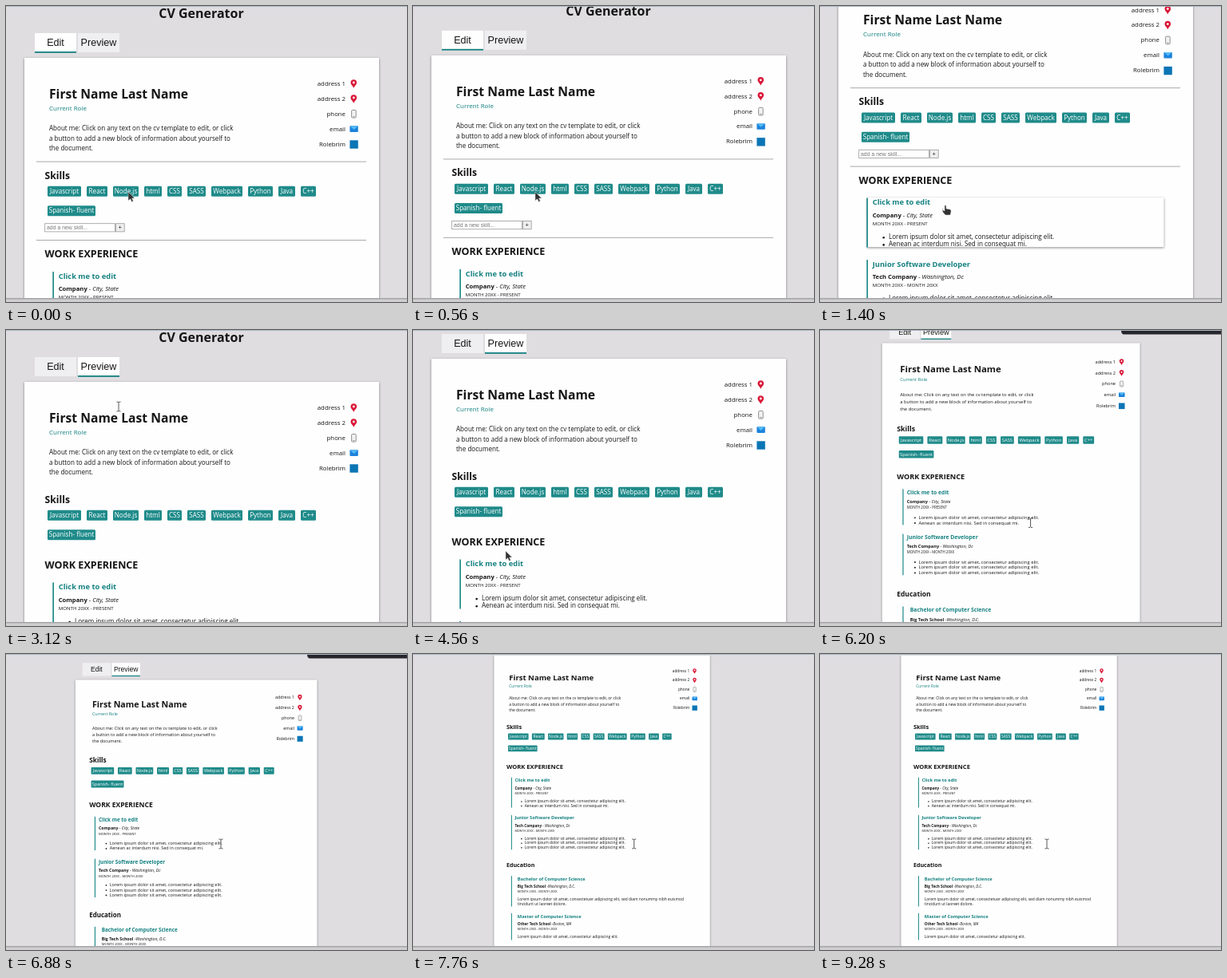
These frames come from a looping animation (502x371 px, 9560 ms). An HTML page:

```html
<!DOCTYPE html>
<html lang="en">
<head>
<meta charset="utf-8">
<title>CV Generator</title>
<style>
  html, body { margin: 0; width: 100%; height: 100%; overflow: hidden; background: #dfdde0; }
  svg { display: block; width: 502px; height: 371px; }
  text { font: 8.05px "Open Sans", "Noto Sans", sans-serif; fill: #161616; white-space: pre; }
  .bold { font-weight: 700; }
  .teal { fill: #148080; }
  .white { fill: #fff; }
  .ui { font-family: "Liberation Sans", Arial, sans-serif; }
  .middle { text-anchor: middle; }
  .end { text-anchor: end; }
  .detail { font-weight: 400; font-style: italic; }
  .sheet { filter: drop-shadow(0 1px 1.5px #0007); }
</style>
</head>
<body>
<svg viewBox="0 0 502 371">
  <rect width="502" height="371" fill="#dfdde0"/>
  <g id="view"></g>
  <path id="zoomBubble" d="M377 0H502V5.5H380Q377 5 377 0Z" fill="#25252b"/>
  <rect width="502" height="1" fill="#a9b6c2"/>
  <rect y="366" width="502" height="5" fill="#cfced0"/>
  <rect y="366" width="502" height="1.5" fill="#a5a4a6"/>
  <g id="cursor">
    <path id="arrow" d="M0 0V11L2.6 8.8 4.4 12.4 6.3 11.4 4.6 8H8Z" fill="#333" stroke="#ddd" stroke-width=".5"/>
    <path id="hand" d="M-1 0Q.5-1 1 1V4L6 5Q7.5 5.5 7 8L6 12H0L-3.5 8Q-4-.0-3 6L-1 7Z" fill="#333" stroke="#ddd" stroke-width=".5"/>
    <path id="beam" d="M-2.5-6Q0-6 0-5Q0-6 2.5-6M0-5V5M-2.5 6Q0 6 0 5Q0 6 2.5 6" fill="none" stroke="#555"/>
  </g>
</svg>
<script>
const LOOP = 9560;
const EDIT_SHIFT = 16.5;
const PREVIEW_AT = 2400;
const ZOOM_CENTER = 223.5;
const LOREM = "Lorem ipsum dolor sit amet, consectetur adipiscing elit.";
const $ = id => document.getElementById(id);

// y is the middle of the capitals
const text = (x, y, content, size = 8.05, cls = "") =>
  `<text x="${x}" y="${y + size * .34}" class="${cls}" style="font-size:${size}px">${content}</text>`;
const rect = (x, y, w, h, fill, extra = "") =>
  `<rect x="${x}" y="${y}" width="${w}" height="${h}" fill="${fill}" ${extra}/>`;

const tab = (id, x, label) =>
  rect(x, 34, 52, 24, "#efeef0", `id="${id}"`) +
  rect(x, 57, 52, 1.8, "#148080", `id="${id}Line"`) +
  text(x + 26, 46, label, 12.6, "ui middle");

const tag = (x, y, w, label) =>
  rect(x, y - 6.5, w, 13, "#1f8b8a", 'rx="1.5"') + text(x + w / 2, y, label, 8.1, "white middle");

const pin = y =>
  `<path d="M435.3 ${y + 5.5}C434 ${y + 2} 431.5 ${y + 1} 431.5 ${y - 1.5}A3.8 3.8 0 0 1 439.1 ${y - 1.5}C439.1 ${y + 1} 436.6 ${y + 2} 435.3 ${y + 5.5}Z" fill="#da1737"/>
   <circle cx="435.3" cy="${y - 1.5}" r="1.4" fill="#fff"/>`;

const entry = (x, y, title, place, detail, dates) =>
  text(x, y, title, 9.35, "bold teal") +
  text(x, y + 16.2, `${place}<tspan class="detail">${detail}</tspan>`, 7.68, "bold") +
  text(x, y + 26.5, dates, 6.1);

const bullets = (y, lines) => lines.map((line, i) =>
  `<circle cx="79.7" cy="${y + i * 9.2 + .7}" r="1.3" fill="#161616"/>` + text(86, y + i * 9.2, line)).join("");

const bar = (top, bottom) => rect(58.3, top, 1.7, bottom - top, "#1f8b8a");

const skills = [[52, 42, "Javascript"], [101, 26, "React"], [134, 32, "Node.js"], [173, 22, "html"],
  [202, 18, "CSS"], [227, 23, "SASS"], [257, 39, "Webpack"], [303, 31, "Python"], [341, 21, "Java"], [369, 19, "C++"]];

const header =
  text(244.5, 10, "CV Generator", 16, "bold middle") +
  tab("editTab", 36, "Edit") + tab("previewTab", 90, "Preview") +
  rect(23, 65, 444, 900, "#fefefe", 'class="sheet"') +
  text(54, 110.5, "First Name Last Name", 15.7, "bold") +
  text(54, 128, "Current Role", 8, "teal") +
  ["About me: Click on any text on the cv template to edit, or click",
   "a button to add a new block of information about yourself to",
   "the document."].map((line, i) => text(54, 153.7 + i * 12.3, line)).join("");

const contacts =
  ["address 1", "address 2", "phone", "email", "Rolebrim"]
    .map((label, i) => text(425, 97.3 + i * 18.9, label, 7.8, "end")).join("") +
  pin(97.5) + pin(116.5) +
  rect(432.6, 130.5, 5.6, 9.6, "#f2f2f2", 'rx="1" stroke="#85858a" stroke-width=".9"') +
  rect(434.3, 138, 2.2, .8, "#85858a") +
  rect(430.4, 150.3, 10.4, 7.6, "#1c83dc", 'rx=".8"') +
  `<path d="M430.6 150.5H440.6L435.6 155Z" fill="#55baf5"/>` +
  rect(430.4, 168.3, 10.4, 10.4, "#0b75b5");

const skillSection =
  text(48.5, 212.5, "Skills", 12.2, "bold") +
  skills.map(([x, w, label]) => tag(x, 232.3, w, label)).join("") +
  tag(52, 256.7, 60, "Spanish- fluent");

const editControls = `<g id="editOnly">` +
  rect(38, 194.6, 413, 1, "#a9a9ab") + rect(38, 293, 413, 1, "#a9a9ab") +
  rect(48.7, 272.7, 87.6, 10.2, "#fff", 'stroke="#999" stroke-width=".8"') +
  text(51, 278, "add a new skill...", 6.9, "ui").replace("style=\"", "style=\"fill:#777;") +
  rect(137.4, 272.7, 10.8, 10.2, "#eee", 'stroke="#999" stroke-width=".8"') +
  text(142.8, 278, "+", 7, "ui middle") + `</g>`;

const history = `<g id="history">` +
  text(48.5, 294.7, "WORK EXPERIENCE", 12.55, "bold") +
  rect(59, 316, 371.5, 62, "#fefefe", 'id="hoverBox" class="sheet"') +
  bar(316.5, 378.5) +
  entry(65.7, 322, "Click me to edit", "Company", " - City, State", "MONTH 20XX - PRESENT") +
  bullets(365.4, [LOREM, "Aenean ac interdum nisi. Sed in consequat mi."]) +
  bar(394, 465) +
  entry(65.7, 399.5, "Junior Software Developer", "Tech Company", " - Washington, Dc", "MONTH 20XX - MONTH 20XX") +
  bullets(442, [LOREM, LOREM, LOREM]) +
  text(48.5, 497.5, "Education", 11.7, "bold") +
  bar(519, 582) +
  entry(71.3, 525, "Bachelor of Computer Science", "Big Tech School", " -Washington, D.C.", "MONTH 20XX - MONTH 20XX") +
  text(71.3, 567.5, "Lorem ipsum dolor sit amet, consectetuer adipiscing elit, sed diam nonummy nibh euismod") +
  text(71.3, 577.2, "tincidunt ut laoreet dolore.") +
  bar(596, 651) +
  entry(71.3, 602.5, "Master of Computer Science", "Other Tech School", " -Boston, MA", "MONTH 20XX - MONTH 20XX") +
  text(71.3, 644.5, LOREM) + `</g>`;

$("view").innerHTML = header + contacts + skillSection + editControls + history;

// Each key is [time, value]; values ease between keys
function ease(keys, t) {
  const next = keys.findIndex(key => key[0] > t);
  if (next < 0) return keys.at(-1)[1];
  if (next === 0) return keys[0][1];
  const [t0, a] = keys[next - 1], [t1, b] = keys[next];
  const p = (t - t0) / (t1 - t0);
  return a + (b - a) * p * p * (3 - 2 * p);
}
const step = (keys, t) => keys.findLast(key => key[0] <= t)[1];

const scrollKeys = [[0, 0], [500, 0], [1050, 92.4], [1500, 92.4], [1880, 0], [4350, 0], [4540, 29], [4580, 29],
  [5050, 155.5], [5800, 155.5], [6350, 17.6], [7250, 17.6], [7600, 62.4]];
const zoomKeys = [[0, 110], [5480, 100], [5580, 90], [5700, 80], [6500, 75], [7200, 67]];
const cursorX = [[0, 153], [1000, 153], [1400, 157], [1800, 157], [2300, 116], [2600, 116], [3100, 141], [3300, 141],
  [4100, 116], [4600, 116], [5100, 248], [5600, 248], [6500, 269], [7300, 269], [8200, 284]];
const cursorY = [[0, 233], [1000, 233], [1400, 250], [1800, 250], [2300, 46], [2600, 46], [3100, 96], [3300, 96],
  [4100, 277], [4600, 277], [5100, 252], [5600, 252], [6500, 238]];
const cursorKinds = [[0, "arrow"], [2250, "hand"], [2750, "arrow"], [2950, "beam"], [3450, "arrow"], [4850, "beam"]];
const bubbleKeys = [[0, false], [5480, true], [7600, false], [7900, true], [8720, false]];

const show = (id, visible) => $(id).setAttribute("visibility", visible ? "visible" : "hidden");

function draw(t) {
  const preview = t >= PREVIEW_AT;
  const scroll = ease(scrollKeys, t);
  const zoom = step(zoomKeys, t) / 110;
  const x = ease(cursorX, t), y = ease(cursorY, t);
  const shift = preview ? 0 : EDIT_SHIFT;
  const blockY = y + scroll - shift;
  const hover = !preview && blockY > 316 && blockY < 378;

  $("view").setAttribute("transform", `translate(${ZOOM_CENTER * (1 - zoom)} ${-scroll * zoom}) scale(${zoom})`);
  $("history").setAttribute("transform", `translate(0 ${shift})`);
  for (const [id, active] of [["editTab", !preview], ["previewTab", preview]]) {
    $(id).setAttribute("fill", active ? "#fefefe" : "#efeef0");
    show(id + "Line", active);
  }
  show("editOnly", !preview);
  show("hoverBox", hover);
  show("zoomBubble", step(bubbleKeys, t));

  const kind = hover ? "hand" : step(cursorKinds, t);
  for (const id of ["arrow", "hand", "beam"]) show(id, id === kind);
  $("cursor").setAttribute("transform", `translate(${x} ${y})`);
}

const start = performance.now();
function tick() {
  draw((performance.now() - start) % LOOP);
  requestAnimationFrame(tick);
}
tick();
</script>
</body>
</html>
```
